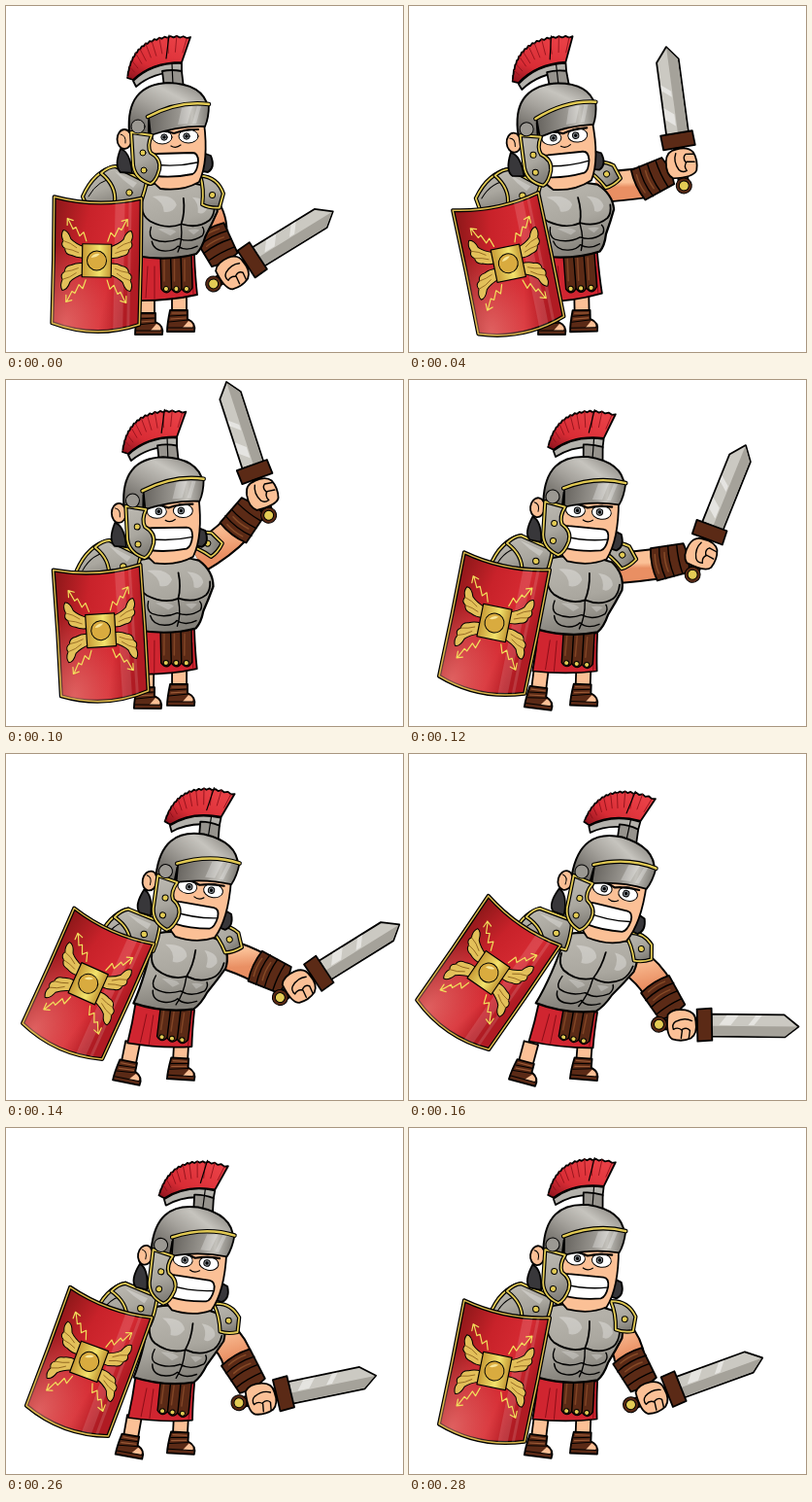
Write an HTML page that moves like this. It is 409 px wide and 356 px high and loops after 300 ms.

```html
<!DOCTYPE html>
<html lang="en">
<head>
<meta charset="utf-8">
<title>Legionary</title>
<style>
html, body { margin: 0; width: 100%; height: 100%; overflow: hidden; background: #fff; }
svg { display: block; width: 409px; height: 356px; }
.k { stroke: #000; stroke-width: 1.8; stroke-linejoin: round; stroke-linecap: round; }
.n { fill: none; }
.thin { stroke-width: 1; }
</style>
</head>
<body>
<svg id="stage" viewBox="0 0 409 356"></svg>
<script>
const GOLD = '#e3cb55', SKIN = '#fbc096', BROWN = '#5b2a16', STEEL = '#aaa79f';
const stops = list => list.map(([o, c, a = 1]) => `<stop offset="${o}" stop-color="${c}" stop-opacity="${a}"/>`).join('');
const lin = (id, dir, ...list) => `<linearGradient id="${id}" ${dir}>${stops(list)}</linearGradient>`;
const shape = (d, fill, width = 1.8) => `<path class="k" d="${d}" fill="${fill}" style="stroke-width:${width}"/>`;
const line = (d, width = 1.4, color = '#000') =>
  `<path class="k n" d="${d}" style="stroke-width:${width};stroke:${color}"/>`;
const trim = (d, fill) => shape(d, fill, 4.2) + line(d, 1.8, GOLD);
const dot = (x, y, r, fill = GOLD) => `<circle class="k thin" cx="${x}" cy="${y}" r="${r}" fill="${fill}"/>`;
const shine = (d, o = .3) => `<path d="${d}" fill="#fff" opacity="${o}"/>`;
const group = (id, body) => `<g id="${id}">${body}</g>`;

const defs = '<defs>' +
  lin('dome', 'x1="0" y1="1" x2=".8" y2="0"', [0, '#57544f'], [.5, '#a6a39d'], [.75, '#c6c4be'], [1, '#8d8a84']) +
  lin('visor', '', [0, '#67645f'], [.5, '#98958f'], [.72, '#c4c2bc'], [1, '#7d7a74']) +
  lin('steel', 'x1="0" y1="0" x2=".3" y2="1"', [0, '#bdbab2'], [.6, STEEL], [1, '#84817a']) +
  lin('plume', 'x1="0" y1="1" x2=".6" y2="0"', [0, '#8a121c'], [.4, '#d92c35'], [1, '#e83f45']) +
  lin('red', 'y2=".3"', [0, '#8a1718'], [.4, '#c8222a'], [.75, '#d62a32'], [1, '#b01b23']) +
  `<radialGradient id="glow" cx=".15" cy=".95" r=".6">${stops([[0, '#ee8a84', .6], [1, '#ee8a84', 0]])}</radialGradient>` +
  lin('brass', '', [0, '#c79a35'], [.6, '#f3e36c'], [1, '#c39734']) +
  lin('limb', 'x1="0" y1="0" x2=".2" y2="1"', [0, SKIN], [1, '#e98f63']) +
  '</defs>';

const sword =
  shape('M54-11L129-11L144 1L130 12L54 12Z', '#cbc9c2') +
  '<path d="M54 1L143 1L130 11L54 11Z" fill="#a5a29a"/>' +
  shine('M70-10L82-10L74 0L62 0ZM100-10L106-10L98 0L92 0Z', .5) +
  shape('M39-16L54-17L55 16L40 17Z', BROWN) +
  shape('M0-5L39-5L39 5L0 5Z', '#6d3a1c') +
  dot(0, 0, 8, BROWN) + dot(0, 0, 5);
const fist =
  shape('M9-10Q14-17 27-15Q38-13 38-3Q40 9 33 14Q24 18 14 15Q7 11 9-10Z', SKIN) +
  line('M17-3Q26-8 34-4M15 5Q20 2 24 6L23 14M24 5Q29 2 32 6L31 14M17-3Q13 0 15 5');
const bracer =
  shape('M-5-17Q-9 0-5 17L29 15Q33 0 29-15Z', BROWN) +
  line('M4-17Q0 0 4 17M13-16Q10 0 13 16M22-15Q20 0 22 15') +
  line('M-2-10Q-4 0-2 10M8-10Q6 0 8 10', 1.5, '#854a27');

const leg =
  shape('M-8-40L7-40L7-17L-8-17Z', SKIN) +
  shape('M-10-20L8-20L8-11Q17-7 15 2L-13 2Q-13-6-10-20Z', BROWN) +
  `<path d="M9-9Q15-6 13-2L3-2Z" fill="${SKIN}"/>` +
  line('M-10-14L8-15M-11-8L9-10M-12-2L14-2', 1) +
  line('M-8-17L6-17M-9-11L6-12', 1.2, '#9a5a36');

const strips = [0, 1, 2].map(i => {
  const x = 160 + i * 10.5;
  return shape(`M${x - 1} 255h11l1 35q-5 9-11 1Z`, BROWN, 1.4) +
    line(`M${x + 3} 261v22`, 1.5, '#814526') + dot(x + 5, 291, 2.6);
}).join('');
const skirt =
  shape('M133 256L194 256Q195 280 197 297Q166 304 131 303Q133 280 133 256Z', '#d02530') +
  line('M146 268L144 300M153 268L153 301M192 270L193 297', 1, '#8c0e18') + strips;

const torso =
  shape('M137 187Q170 176 205 185Q219 196 218 212Q213 224 206 238Q203 250 197 256Q168 264 135 258Q140 230 137 187Z', 'url(#steel)', 2.2) +
  line('M183 198Q185 213 181 225Q166 231 149 222Q141 217 140 206M182 225Q198 230 210 221Q215 216 215 207', 1.8) +
  line('M181 226Q183 242 178 254M150 228Q147 238 153 241Q166 246 179 240Q191 245 203 237Q206 232 203 228M151 243Q153 253 165 253Q174 253 178 248Q186 254 198 248') +
  shine('M151 196Q172 193 176 205Q172 214 163 212Q163 202 151 196ZM192 197Q207 198 208 208Q204 216 198 213Q199 203 192 197Z') +
  shine('M157 230Q170 228 176 233L170 237ZM188 231Q196 229 200 231L194 236Z', .25);

const rightPad =
  trim('M195 177Q213 176 221 192L219 207Q209 209 201 206Q201 190 195 177Z', 'url(#steel)') + dot(210, 195, 3);
const leftPad =
  trim('M88 193Q100 166 122 162L130 182L124 204L94 208Z', 'url(#steel)') +
  line('M94 193Q104 175 122 174', 1) +
  trim('M107 169Q115 162 122 162L154 178Q150 196 144 207Q132 202 121 199Q123 182 107 169Z', 'url(#steel)') +
  shine('M121 167L144 179L140 184Q130 177 121 167Z') + dot(136, 189, 3.2);

// fan of bristles with a ragged top edge
const quad = (a, b, c, u) => (1 - u) * (1 - u) * a + 2 * u * (1 - u) * b + u * u * c;
function fan() {
  const n = 32, top = [];
  let hairs = '';
  for (let i = 0; i <= n; i++) {
    const u = i / n, x = quad(125, 130, 190, u), y = quad(74, 24, 32, u) + i % 2 * 1.5;
    top.push(`${x} ${y}`);
    if (i % 3 == 1) hairs += `M${x} ${y}L${x + (quad(131, 150, 181, u) - x) * .6} ${y + (quad(76, 58, 58, u) - y) * .6}`;
  }
  return shape(`M${top.join('L')}L181 58Q150 58 131 76Z`, 'url(#plume)') +
    line(hairs, .8, '#8c1019') + line('M168 30L165 54', 1.2);
}

const eye = (x, y, px) =>
  `<ellipse class="k thin" cx="${x}" cy="${y}" rx="10" ry="7" fill="#fff"/>` + dot(px, y, 3.2, '#8b9299') +
  `<circle cx="${px}" cy="${y}" r="1.7"/>`;
const head =
  shape('M118 147Q128 150 130 172L118 171Q111 165 118 147Z', '#38373a') +
  shape('M200 150L211 154Q216 166 208 171L197 169Z', '#38373a') +
  `<ellipse class="k" cx="122" cy="137" rx="7.5" ry="10" fill="${SKIN}"/>` + line('M118 132Q124 133 123 141', 1) +
  shape('M144 128L204 120Q209 160 199 181Q182 191 159 188Q148 180 146 165Z', SKIN) +
  eye(161, 135, 163) + eye(188, 134, 186) +
  line('M150 130Q162 127 173 131Q184 127 198 127', 2.2) +
  line('M170 144Q175 147 180 143', 1.2) +
  shape('M150 157Q150 152 156 152L192 151Q198 151 198 160Q197 171 192 173Q172 177 155 175Q151 171 150 157Z', '#fff') +
  line('M151 163Q175 166 197 161') +
  fan() +
  shape('M131 77Q151 58 181 59L181 68Q153 67 134 83Z', '#b4b2ac') +
  shape('M161 67Q170 65 181 67L183 84L163 84Z', '#96938d') + line('M171 60L172 81', 1.2) +
  shape('M127 130Q123 81 167 79Q203 80 208 104L147 118L147 134Z', 'url(#dome)', 2) +
  shape('M147 114Q178 97 209 101Q209 115 205 124Q178 123 149 133Z', 'url(#visor)') +
  shine('M181 105L192 103L187 121L177 122ZM197 103L201 103L196 121L192 121Z', .28) +
  line('M146 114Q178 97 209 101', 4.6) + line('M146 114Q178 97 209 101', 2.4, GOLD) +
  trim('M129 130L150 133Q145 144 149 151Q160 157 158 168Q155 180 149 183Q133 178 131 164Z', 'url(#steel)') +
  dot(141, 151, 3) + dot(142, 169, 3) + dot(136, 124, 7, '#9b9892');

const quarter =
  shape('M-13-14Q-22-17-27-22Q-30-31-35-31Q-38-26-35-20Q-38-15-33-12Q-33-6-26-5Q-20-2-13-3Z', '#e3c05a', 1) +
  line('M-35-20Q-27-18-21-13M-33-12Q-25-11-19-8', .8, '#8a5f1c') +
  line('M-11-20L-14-29L-18-25L-22-34L-25-32L-30-42M-31-36L-31-43L-25-41', 1.2, '#f2df5c');
const rim = 'M-45-65Q0-54 45-65Q46 0 45 65Q0 81-45 65Q-44 0-45-65Z';
const shield =
  shape(rim, 'url(#red)', 4) + `<path d="${rim}" fill="url(#glow)"/>` + line(rim, 1.5, '#dcb94c') +
  shine('M18-60L28-62L28 69L18 71ZM32-62L35-63L35 67L32 68Z', .13) +
  ['1 1', '-1 1', '1 -1', '-1 -1'].map(c => `<g transform="scale(${c})">${quarter}</g>`).join('') +
  shape('M-15-17L15-17L15 17L-15 17Z', 'url(#brass)', 1.2) + dot(0, 0, 10, '#d9ab3f') +
  '<path d="M-6-3Q-3-8 3-7Q0-3-6-3Z" fill="#f7e69a"/>';

document.getElementById('stage').innerHTML = defs +
  '<path id="armEdge" class="n" stroke="#000" stroke-width="33"/>' +
  '<path id="arm" class="n" stroke="url(#limb)" stroke-width="29"/>' +
  group('bracer', bracer) + group('sword', sword + fist) +
  group('footL', leg) + group('footR', leg) + group('skirt', skirt) +
  group('torso', torso) + group('rightPad', rightPad) + group('leftPad', leftPad) +
  group('head', head) + group('shield', shield);

// body: head x, y, tilt, then shield x, y, tilt
const rest = [136, 124, 0, 93.5, 262, 1];
const raise = [109, 129, -7.3, 109.5, 267, -22];
const ready = [148, 120, 7, 88, 250, 11.5];
const strike = [178, 121, 15, 82, 225, 34.5];
// arm: shoulder x, y, upper arm angle, length, forearm angle, sword angle
const low = [203, 205, 74, 29, 62, -31.6];
const high = [184, 172, -71, 46, -97, -151.8];
const thrust = [229, 212, 47, 33, 58, .5];

const bodyBeats = [[0, rest], [80, raise], [120, ready], [160, strike], [234, strike], [280, ready], [300, rest]];
const armBeats = [[0, low], [80, high], [160, thrust], [234, thrust], [312, low]];
const ease = u => u + .2 * u * (1 - u);
function sample(beats, t) {
  const i = beats.findIndex(b => b[0] > t), [t0, a] = beats[i - 1], [t1, b] = beats[i];
  const u = ease((t - t0) / (t1 - t0));
  return a.map((v, n) => v + (b[n] - v) * u);
}

const el = id => document.getElementById(id);
const polar = (r, deg) => [r * Math.cos(deg * Math.PI / 180), r * Math.sin(deg * Math.PI / 180)];
const place = (id, x, y, turn, px = 0, py = 0) =>
  el(id).setAttribute('transform', `translate(${x} ${y}) rotate(${turn}) translate(${-px} ${-py})`);
// maps point a to p and b to q, with the cross axis tilted
function shear(id, a, b, p, q, tilt) {
  const [c, s] = polar(1, tilt), w = b[0] - a[0], h = b[1] - a[1];
  const e = (q[0] - p[0] - w * c) / h, f = (q[1] - p[1] - w * s) / h;
  el(id).setAttribute('transform',
    `matrix(${[c, s, e, f, p[0] - c * a[0] - e * a[1], p[1] - s * a[0] - f * a[1]]})`);
}

function body(x, y, tilt, shieldX, shieldY, shieldTilt) {
  const [c, s] = polar(1, tilt);
  const below = (dx, dy) => [x + dx * c - dy * s, y + dx * s + dy * c];
  const back = Math.max(tilt, 0);
  place('head', x, y, tilt, 136, 124);
  shear('torso', [166, 260], [172, 187], [165 - .3 * tilt, 259 + .3 * tilt], below(36, 63), .65 * tilt);
  shear('skirt', [174, 258], [176, 291], [174, 258 + .4 * tilt], [176 - .4 * tilt, 291 + .15 * tilt], .7 * tilt);
  place('leftPad', ...below(-9, 68), -.4 * tilt, 136, 189);
  place('footL', 146 - 2 * back, 336, back);
  place('footR', 179, 333, .3 * tilt);
  place('shield', shieldX, shieldY, shieldTilt);
}

function arm(x, y, upper, length, fore, turn) {
  const [dx, dy] = polar(length + 10 * Math.cos(upper * Math.PI / 180), upper);
  const ex = x + dx, ey = y + dy;
  const [hx, hy] = polar(44, fore), [gx, gy] = polar(22, turn);
  const d = `M${x} ${y}Q${x + dx / 2 + 6} ${y + dy / 2} ${ex} ${ey}`;
  el('armEdge').setAttribute('d', d);
  el('arm').setAttribute('d', d);
  place('bracer', ex, ey, fore);
  place('sword', ex + hx - gx, ey + hy - gy, turn);
  place('rightPad', x + 6, y - 14, .55 * (upper - 60), 206, 192);
}

// 20 ms steps, with the lunge held from 160 to 240
const start = performance.now();
function tick() {
  const now = Math.floor((performance.now() - start) % 300 / 20) * 20;
  const t = now > 160 && now < 240 ? 160 : now;
  body(...sample(bodyBeats, t));
  arm(...sample(armBeats, t));
  requestAnimationFrame(tick);
}
tick();
</script>
</body>
</html>
```
